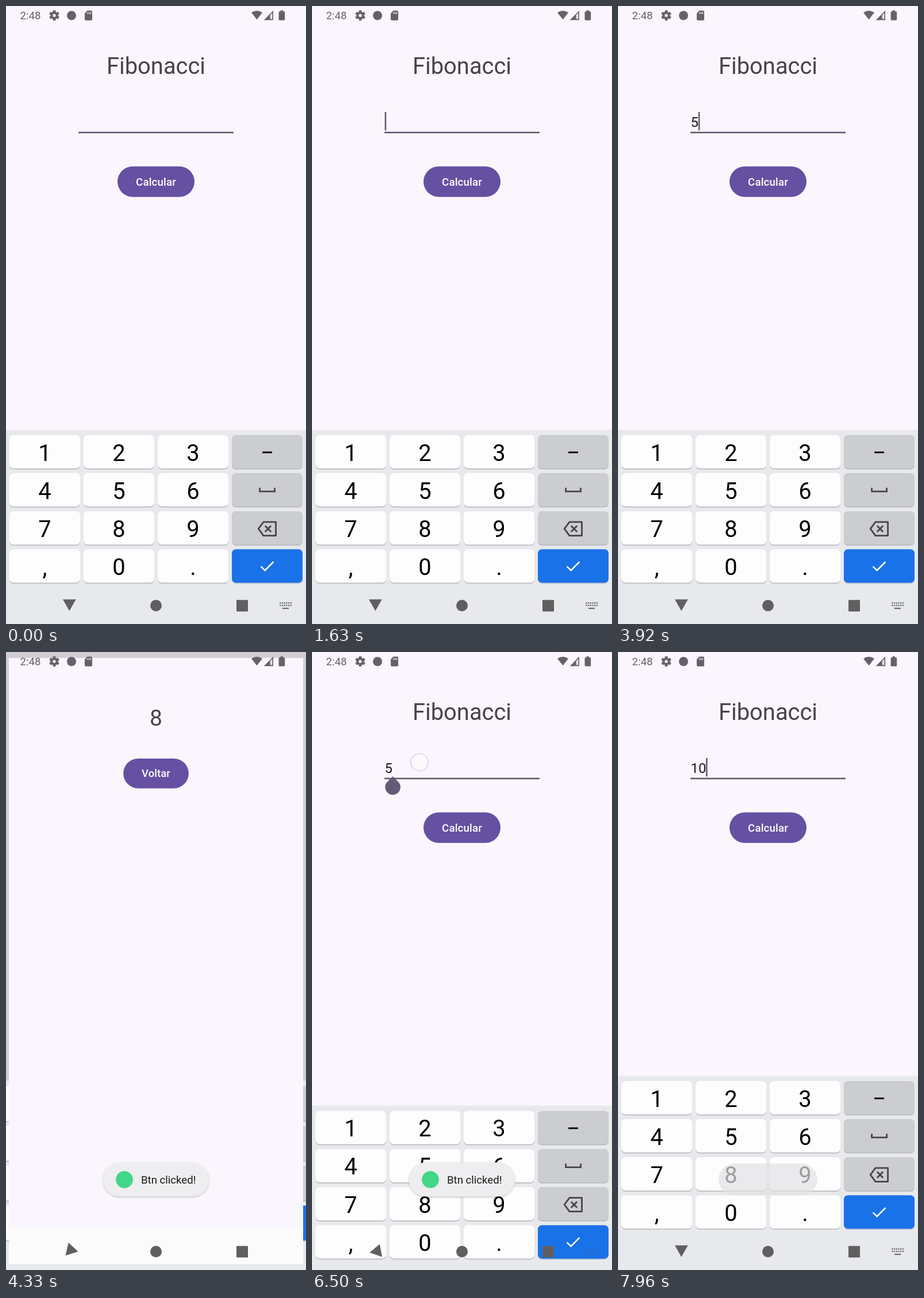
An HTML page for the animation above (8 s loop, 522x1073 px).

```html
<!DOCTYPE html>
<html lang="pt">
<head>
<meta charset="utf-8">
<title>Fibonacci</title>
<style>
  html, body { margin: 0; width: 100%; height: 100%; overflow: hidden; background: #fbf6fd; }
  svg { display: block; width: 522px; height: 1073px; font-family: Roboto, "Noto Sans", sans-serif; }
  .mid { text-anchor: middle; }
  .big { font-size: 39.9px; }
  .label { font-size: 18.6px; font-weight: 500; letter-spacing: .17px; fill: #fff; }
  .small { font-size: 18.6px; }
  .win { transform-origin: 261px 536.5px; }
</style>
</head>
<body>
<svg viewBox="0 0 522 1073" xmlns="http://www.w3.org/2000/svg">
  <g id="form" class="win">
    <rect width="522" height="1073" fill="#fbf6fd"/>
    <rect y="1008" width="522" height="65" fill="#fcfbfc"/>
    <text class="mid big" x="261" y="117.6" fill="#47434a">Fibonacci</text>
    <text id="value" x="126.6" y="209.6" font-size="23.9" fill="#1d1b20"></text>
    <rect x="126" y="218.4" width="270" height="2.6" fill="#605a72"/>
    <rect id="cursor" y="184" width="2.6" height="32" fill="#625b71"/>
    <path id="handle" d="M140.6 216 L150 225.2 A13.3 13.3 0 1 1 131.2 225.2 Z" fill="#625b78"/>
    <rect id="calc" x="194" y="278.4" width="134" height="53" rx="26.5" fill="#6650a2"/>
    <text class="mid label" x="261" y="312.2">Calcular</text>
    <rect id="scrim" width="522" height="1073"/>
  </g>
  <g id="board" class="win"></g>
  <g id="result" class="win">
    <rect width="522" height="1073" fill="#fbf6fd"/>
    <rect y="1008" width="522" height="65" fill="#fcfbfc"/>
    <text class="mid big" x="261" y="119.8" fill="#47434a">8</text>
    <rect id="back" x="203" y="178.2" width="116" height="52.6" rx="26.3" fill="#6650a2"/>
    <text class="mid label" x="261" y="211.2">Voltar</text>
  </g>
  <g id="status" fill="#65616a">
    <text class="small" x="24.6" y="23">2:48</text>
    <g transform="translate(84 16.4)">
      <circle r="4.6" fill="none" stroke="#65616a" stroke-width="4"/>
      <g id="gear"></g>
    </g>
    <circle cx="114" cy="16.5" r="8"/>
    <path d="M141.5 8H148a2 2 0 0 1 2 2V23a2 2 0 0 1-2 2H139a2 2 0 0 1-2-2V12.7Z"/>
    <path d="M142 10.5v3.5M144.7 10.5v3.5M147.4 10.5v3.5" stroke="#fbf6fd" stroke-width="1.2"/>
    <path d="M427 11.6Q436.5 4.8 446 11.6L436.5 23.6Z"/>
    <path d="M448.6 24.4L465 8V24.4Z"/>
    <path d="M459.6 15.8L463.4 12V22.6H459.6Z" fill="#e9e4ec"/>
    <path d="M477.6 9.6V7.6H482V9.6H484Q485.2 9.6 485.2 10.8V23.6Q485.2 24.8 484 24.8H475.8Q474.6 24.8 474.6 23.6V10.8Q474.6 9.6 475.8 9.6Z"/>
  </g>
  <g fill="#5f5f60">
    <path id="navBack" d="M-10.9 -10.2H11.9L.5 9.8Z"/>
    <circle cx="261" cy="1041" r="10"/>
    <rect x="401" y="1031.3" width="20" height="20" rx="1"/>
    <g id="dots"></g>
  </g>
  <g id="toast" style="transform-origin:260.8px 916px">
    <rect id="shade" x="168.4" y="887.6" width="185" height="59.4" rx="29.7" fill="#000" opacity=".2" style="filter:blur(1.4px)"/>
    <rect id="pill" x="168.4" y="886.2" width="185" height="59.4" rx="29.7" fill="#eeedef"/>
    <g id="message">
      <circle cx="206" cy="916" r="14.8" fill="#42d688"/>
      <text class="small" x="235" y="923" fill="#1c1b1d">Btn clicked!</text>
    </g>
  </g>
  <circle id="touch" fill="#fff" fill-opacity=".3" stroke="#ddd8f4" stroke-width="2"/>
</svg>
<script>
const LOOP = 8000;
const $ = id => document.getElementById(id);
const set = (id, attrs) => { for (const k in attrs) $(id).setAttribute(k, attrs[k]); };
const show = (id, on) => { $(id).style.display = on ? '' : 'none'; };
const clamp = v => Math.min(1, Math.max(0, v));
const part = (t, start, length) => clamp((t - start) / length);
const smooth = p => p * p * (3 - 2 * p);

// Cubic curve through (x0,y0)..(x3,y3), solved for x by halving.
function curve(x, x0, y0, x1, y1, x2, y2, x3, y3) {
  const at = (u, a, b, c, d) => {
    const v = 1 - u;
    return v * v * v * a + 3 * v * v * u * b + 3 * v * u * u * c + u * u * u * d;
  };
  let lo = 0, hi = 1;
  for (let i = 0; i < 24; i++) {
    const m = (lo + hi) / 2;
    if (at(m, x0, x1, x2, x3) < x) lo = m; else hi = m;
  }
  return at(lo, y0, y1, y2, y3);
}
const windowEase = p => p <= 0 ? 0 : p >= 1 ? 1 : p < .166
  ? curve(p, 0, 0, .05, 0, .133, .06, .166, .4)
  : curve(p, .166, .4, .208, .82, .25, 1, 1, 1);
const slideEase = p => p <= 0 ? 0 : p >= 1 ? 1 : curve(p, 0, 0, .2, 0, 0, 1, 1, 1);

function buildBoard() {
  const labels = ['1', '2', '3', '', '4', '5', '6', '', '7', '8', '9', '', ',', '0', '.', ''];
  let s = '<rect y="735.5" width="522" height="2" fill="#efebf2"/>' +
    '<rect y="737" width="522" height="345" fill="#e7e9ec"/>';
  labels.forEach((label, i) => {
    const x = 6 + 129 * (i % 4), y = 745 + 66.1 * Math.floor(i / 4);
    const fill = i === 15 ? '#1a72e8' : i % 4 === 3 ? '#cccdd1' : '#fdfdfd';
    const key = (dy, color) => `<rect x="${x}" y="${y + dy}" width="123" height="58" rx="7" fill="${color}"/>`;
    s += key(1.5, i === 15 ? '#a9b6cd' : '#b4b5b8') + key(0, fill);
    s += `<text class="mid big" x="${x + 61.5}" y="${y + 44.5}">${label}</text>`;
  });
  s += `<rect x="446" y="773.6" width="17" height="2.8"/>
    <g fill="none" stroke="#45444a" stroke-width="2.8">
      <path d="M441.6 836.5V842.8H467.6V836.5"/>
      <path d="M448 895.8H469.6V919.6H448L439.2 907.7Z" stroke-linejoin="round"/>
      <path d="M450.8 902.6L461.2 913M461.2 902.6L450.8 913"/>
      <path d="M443.6 973.2L450.6 980L465.4 965" stroke="#fff" stroke-width="2.5"/>
    </g>
    <rect id="press" width="123" height="58" rx="7" opacity=".12"/>`;
  $('board').innerHTML = s;
}

function buildIcons() {
  let s = '';
  for (let a = 0; a < 360; a += 60) s += `<rect x="-2.4" y="-8.8" width="4.8" height="4" rx=".6" transform="rotate(${a})"/>`;
  $('gear').innerHTML = s;
  s = '<rect x="481" y="1044.8" width="11" height="2"/>';
  for (let i = 0; i < 12; i++)
    s += `<rect x="${476.2 + 3.7 * (i % 6)}" y="${i < 6 ? 1035.4 : 1039.6}" width="2.2" height="2.2"/>`;
  $('dots').innerHTML = s;
}

const OPEN = 4180, CLOSE = 5870, RAISE = 6372;
// start, end, x, y, radius
const TAPS = [
  [2400, 2500, 196, 841, 15], [4030, 4130, 262, 306, 15], [5670, 5830, 270, 182, 14],
  [6370, 6530, 187, 191.5, 15], [6850, 6950, 454, 907, 15],
  [7250, 7350, 67, 775, 15], [7600, 7700, 196, 973, 15]
];
const TYPED = [[0, ''], [2500, '5'], [6950, ''], [7350, '1'], [7700, '10']];

function draw(t) {
  const open = windowEase(part(t, OPEN, 450)), close = windowEase(part(t, CLOSE, 450));
  const raised = slideEase(part(t, RAISE, 285));
  const typed = TYPED.filter(e => e[0] <= t).pop()[1];

  $('value').textContent = typed;
  set('cursor', { x: 126.6 + 13.2 * typed.length });
  show('cursor', t < 4000 ? t % 1000 >= 500 : t >= 6950);
  show('handle', t >= 6420 && t < 6950);

  const oldScale = t < CLOSE ? 1 + .05 * open : 1.1 - .1 * close;
  $('form').style.transform = `scale(${oldScale})`;
  set('scrim', { opacity: t < CLOSE ? .17 * part(t, OPEN, 120) : 0 });

  show('board', t < OPEN + 450 || t >= RAISE);
  $('board').style.transform = t < CLOSE ? `scale(${oldScale})` : `translateY(${336 * (1 - raised)}px)`;

  show('result', t >= OPEN && t < CLOSE + 450);
  $('result').style.transform = `scale(${t < CLOSE ? .85 + .15 * open : 1 - .1 * close})`;
  $('result').style.opacity = t < CLOSE ? part(t, OPEN + 50, 83) : 1 - part(t, CLOSE + 35, 83);

  const turn = smooth(part(t, 4244, 180)) - smooth(part(t, 6462, 180));
  set('navBack', { transform: `translate(109.8 1040.5) rotate(${90 * turn})` });
  set('dots', { opacity: t < 4244 ? 1 : part(t, 6462, 180) });

  const enter = smooth(part(t, 4150, 150)), leave = part(t, 7900, 86);
  show('toast', t >= 4150 && leave < 1);
  $('toast').style.transform = `scale(${.9 + .1 * enter - .1 * leave})`;
  $('toast').style.opacity = enter;
  set('pill', { opacity: 1 - .43 * leave, fill: leave ? '#e2e1e4' : '#eeedef' });
  set('shade', { opacity: leave ? 0 : .2 });
  set('message', { opacity: 1 - part(leave, 0, .6) });

  const tap = TAPS.find(e => t >= e[0] && t < e[1]);
  show('touch', tap);
  show('press', tap && tap[3] > 740);
  if (tap) {
    const [, , x, y, r] = tap;
    set('touch', { cx: x, cy: y, r, 'stroke-opacity': y === 182 ? .3 : 1, 'fill-opacity': y === 182 ? .13 : .3 });
    set('press', { x: 6 + 129 * Math.floor((x - 6) / 129), y: 745 + 66.1 * Math.floor((y - 745) / 66.1) });
  }
  const lit = (start, end) => t >= start && t < end ? '#745faa' : '#6650a2';
  set('calc', { fill: lit(4040, 4300) });
  set('back', { fill: lit(5680, 6000) });
}

function tick() {
  draw(performance.now() % LOOP);
  requestAnimationFrame(tick);
}
buildBoard();
buildIcons();
tick();
</script>
</body>
</html>
```
